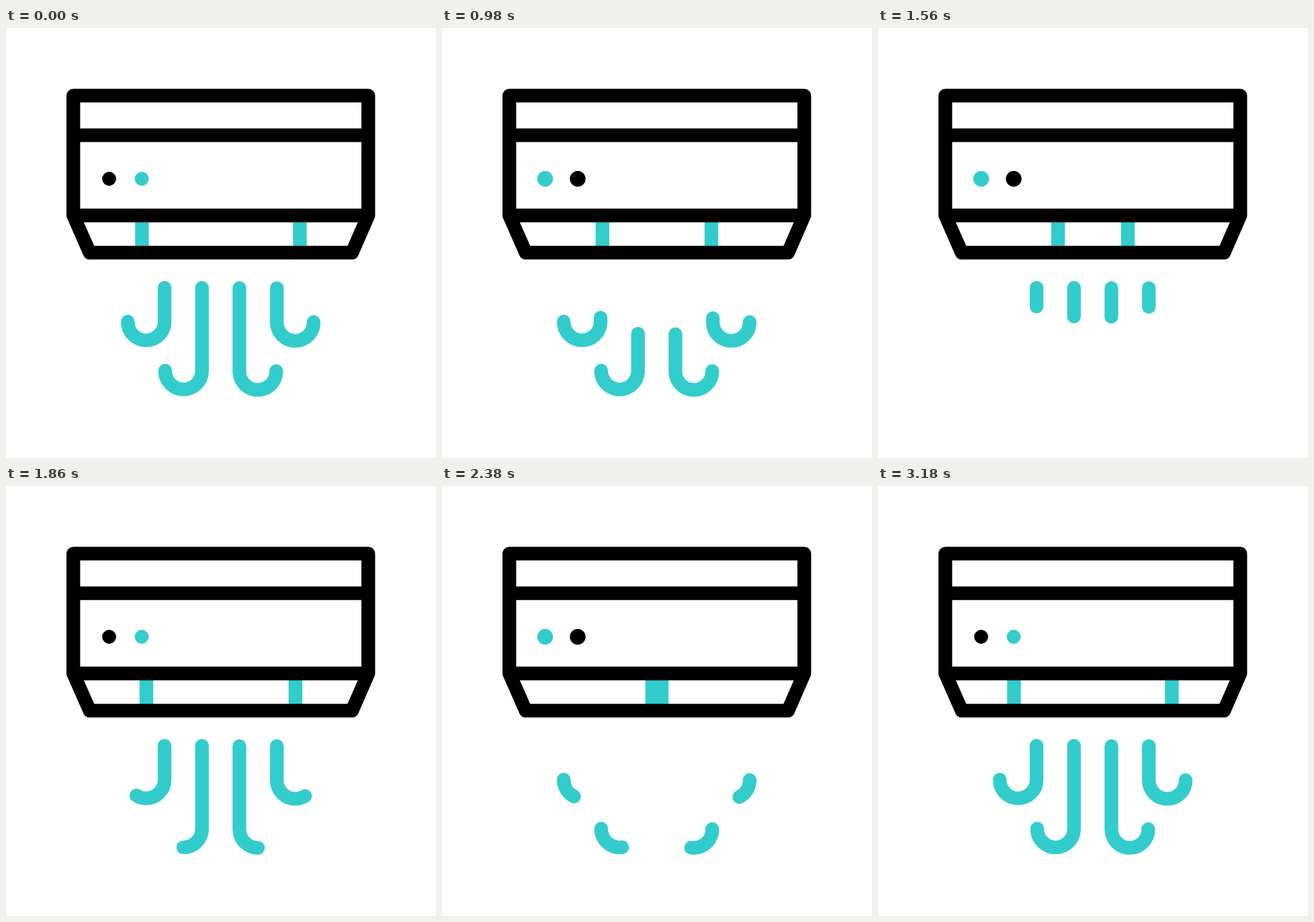
Write an HTML page that moves like this. It is 640 px wide and 640 px high and loops after 3600 ms.

```html
<!DOCTYPE html>
<html lang="en">
<head>
<meta charset="utf-8">
<title>Air conditioner</title>
<style>
  html, body { margin: 0; width: 100%; height: 100%; overflow: hidden; background: #fff; }
  svg { display: block; width: 100%; height: 100%; }
  path { fill: none; stroke-width: 20.4; stroke-linecap: round; stroke-linejoin: round; }
  .teal path { stroke: #33cccc; }
  .teal rect { fill: #33cccc; }
</style>
</head>
<body>
<svg viewBox="0 0 640 640">
  <g class="teal">
    <rect id="left" y="280" width="20.4" height="54"/>
    <rect id="right" y="280" width="20.4" height="54"/>
  </g>
  <path stroke="#000" d="M100.2 279V100.6H539.2V279L515 334.4H124.6L100.2 279H539.2M100.2 159.6H539.2"/>
  <circle id="dotA" cx="153.5" cy="224.5"/>
  <circle id="dotB" cx="202" cy="224.5"/>
  <g class="teal" id="air">
    <path pathLength="1" d="M236 386.7V438A27.4 27.4 0 0 1 181.2 437"/>
    <path pathLength="1" d="M291.7 386.7V511A27.4 27.4 0 0 1 236.9 510"/>
    <path pathLength="1" d="M347.4 387.3V511.6A27.4 27.4 0 0 0 402.2 510.8"/>
    <path pathLength="1" d="M403.1 387.3V438.6A27.4 27.4 0 0 0 457.9 437.8"/>
  </g>
</svg>
<script>
const LOOP = 3600, STEP = 20, TEAL = '#33cccc';
const $ = id => document.getElementById(id);
const streams = [...$('air').children];

// Progress keys [step, cycles]: two cycles, easing in and out only at the ends.
const airKeys = [[35, 0], [49, .1625], [65, .456], [71, .5], [93, .8975], [119, 1.3875], [135, 1.677], [159, 2]];
const barKeys = [[35, 0], [49, .155], [65, .457], [93, 1.028], [119, 1.53], [135, 1.832], [153, 2]];

// Monotone cubic curve through the keys, flat at both ends.
function curve(keys) {
  const last = keys.length - 1;
  const slope = i => (keys[i + 1][1] - keys[i][1]) / (keys[i + 1][0] - keys[i][0]);
  const tangent = i => i === 0 || i === last ? 0 : 2 / (1 / slope(i - 1) + 1 / slope(i));
  return x => {
    if (x <= keys[0][0]) return keys[0][1];
    if (x >= keys[last][0]) return keys[last][1];
    const i = keys.findIndex(k => k[0] > x) - 1;
    const [x0, y0] = keys[i], [x1, y1] = keys[i + 1];
    const w = x1 - x0, u = (x - x0) / w, v = 1 - u;
    return y0 + (y1 - y0) * u * u * (3 - 2 * u) + w * u * v * (tangent(i) * v - tangent(i + 1) * u);
  };
}
const airAt = curve(airKeys), barAt = curve(barKeys);

function setDot(id, color, r) {
  $(id).setAttribute('fill', color);
  $(id).setAttribute('r', r);
}

function draw(step) {
  // Louvre bars swap sides at an even pace.
  const gap = 117.5 * Math.abs(1 - 2 * (barAt(step) % 1));
  $('left').setAttribute('x', 309.7 - gap);
  $('right').setAttribute('x', 309.7 + gap);

  // Streams vanish from the top, then grow back from the top.
  const q = airAt(step) % 1 * 2;
  const start = q < 1 ? q : 0, length = q < 1 ? 1 - q : q - 1;
  for (const s of streams) {
    s.style.visibility = length > .002 ? 'visible' : 'hidden';
    s.style.strokeDasharray = `${length} 9`;
    s.style.strokeDashoffset = -start;
  }

  const swapped = step >= 36 && step < 126 && Math.floor(step / 18) % 2 === 0;
  const r = swapped ? 11.7 : 10.4;
  setDot('dotA', swapped ? TEAL : '#000', r);
  setDot('dotB', swapped ? '#000' : TEAL, r);
}

const begin = performance.now();
function tick() {
  draw(Math.floor((performance.now() - begin) % LOOP / STEP));
  requestAnimationFrame(tick);
}
tick();
</script>
</body>
</html>
```
